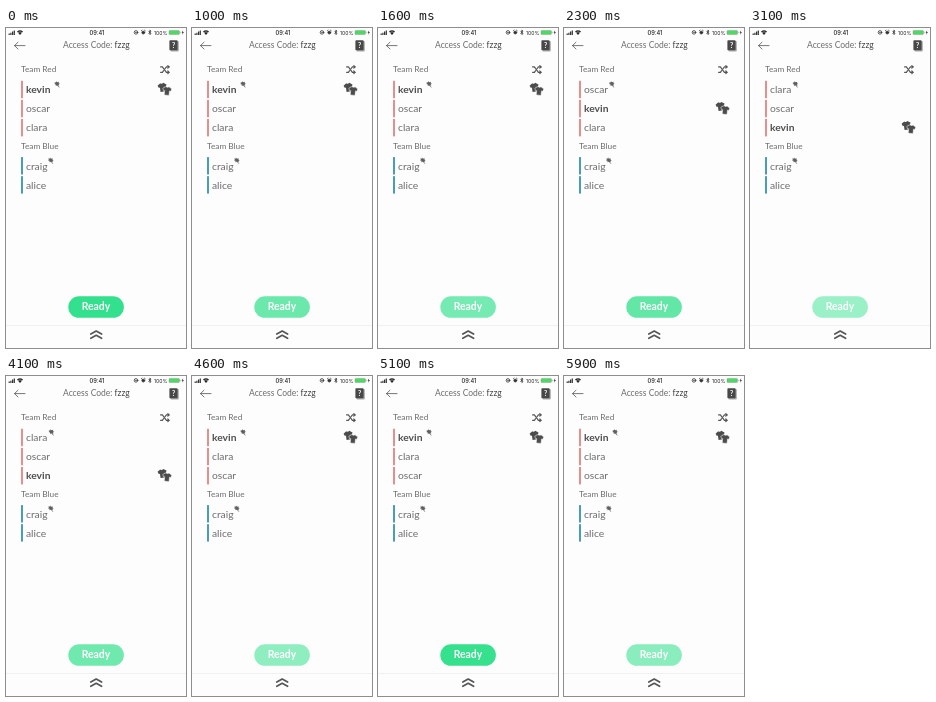
Recreate the animation shown at these times as an HTML page. Size 180 by 320 pixels, loop 6 s.

```html
<!DOCTYPE html>
<html lang="en">
<head>
<meta charset="utf-8">
<title>Team lobby</title>
<style>
html, body { margin: 0; width: 100%; height: 100%; overflow: hidden; background: #fdfdfd; }
svg { display: block; width: 100vw; height: 100vh; }
text { font-family: Lato, "Open Sans", sans-serif; fill: #6c6c6c; }
.name { font-size: 10.3px; }
.me { font-weight: 700; fill: #505050; }
.team { font-size: 8.3px; }
.status { font-family: Inter, Roboto, sans-serif; fill: #222; }
.line { fill: none; stroke: #555; stroke-linecap: round; stroke-linejoin: round; }
</style>
</head>
<body>
<svg viewBox="0 0 180 320" xmlns="http://www.w3.org/2000/svg">
  <defs>
    <path id="leaf" fill="#606060" d="M0 .8 1.5 1.2 2 0 3 1.1 4.6.6 4.4 2 5.7 2.6 4.4 3.3 5 4.4 3.6 4.2 5.4 6 4.8 6.2 2.8 4.2 1.4 4.6 1.5 3.2 0 2.8 .9 1.9Z"/>
    <path id="shirt" d="M0 2 3 0Q4.5 1.4 6 0L9 2 8 4.6 6.9 4.1V8.6H2.1V4.1L1 4.6Z"/>
  </defs>
  <rect width="180" height="320" fill="#fdfdfd"/>

  <!-- status bar -->
  <path d="M3.2 6.9V5.6M4.9 6.9V4.7M6.6 6.9V3.6M8.3 6.9V2.4" stroke="#333" stroke-width="1.2"/>
  <path fill="#222" d="M11 3.5Q14 .9 17 3.5L14 7Z"/>
  <path class="line" d="M12 4.5Q14 2.8 16 4.5" stroke-width=".5" style="stroke:#fdfdfd"/>
  <text class="status" x="91" y="6.6" font-size="5.7" font-weight="500" text-anchor="middle">09:41</text>
  <g class="line" stroke-width=".8" style="stroke:#333">
    <circle cx="130" cy="4.4" r="1.8"/><path d="M129.5 4.4h1"/>
    <circle cx="137.3" cy="4.6" r="1.4" fill="#333"/><path d="M135.4 2.7l.7-.5M139.2 2.7l-.7-.5"/>
    <path d="M142.8 3.2 145 5.5 143.9 6.6V2.1L145 3.2 142.8 5.5"/>
  </g>
  <text class="status" x="148" y="6.5" font-size="5.1">100%</text>
  <rect x="163" y="2.4" width="10.4" height="4.2" rx=".8" fill="#4cd964" stroke="#888" stroke-width=".4"/>
  <path d="M174.2 3.7v1.6" stroke="#888" stroke-width=".6"/>
  <path fill="#333" d="M177.2 2.2 175.6 4.8H176.6L176.2 6.8 177.9 4.1H176.9Z"/>

  <!-- header -->
  <path class="line" stroke-width=".8" d="M19 17.6H8.5M12 14.2 8.5 17.6 12 21"/>
  <text x="57" y="20.2" font-size="8.5">Access Code: <tspan fill="#444">fzzg</tspan></text>
  <rect x="164.4" y="13" width="8.4" height="10.6" rx="1" fill="#a8a8a8"/>
  <rect x="163.4" y="12.2" width="8.2" height="10" rx=".8" fill="#484848"/>
  <text x="167.5" y="19.6" font-size="7" font-weight="700" text-anchor="middle" style="fill:#fff">?</text>

  <!-- teams -->
  <text class="team" x="15" y="44.2">Team Red</text>
  <text class="team" x="15" y="120.8">Team Blue</text>
  <g class="line" stroke-width="1.2">
    <path d="M154.6 38.9H156.4L160.4 44.3H163M154.6 44.3H156.4L157.6 42.7M159.2 40.5 160.4 38.9H163"/>
    <path d="M161.8 37.6 163.1 38.9 161.8 40.2M161.8 43 163.1 44.3 161.8 45.6"/>
  </g>
  <g id="bars"></g>
  <g id="rows"></g>
  <g id="shirts" fill="#4c4c4c">
    <use href="#shirt" transform="translate(151.8 55) rotate(-8 4.5 4)"/>
    <use href="#shirt" transform="translate(156.6 58.6) rotate(6 4.5 4)" stroke="#fdfdfd" stroke-width=".5"/>
  </g>

  <!-- footer -->
  <rect id="pill" x="62.3" y="268.3" width="55.6" height="21.5" rx="10.75"/>
  <text x="90" y="282.3" font-size="10.4" font-weight="700" text-anchor="middle" style="fill:#fff">Ready</text>
  <path d="M0 297.5H180" stroke="#f0f0f0" stroke-width="1"/>
  <path class="line" stroke-width="1.7" d="M84.8 306 90.2 303 95.6 306M84.8 310.3 90.2 307.3 95.6 310.3"/>
</svg>
<script>
const LOOP = 6000, ROW = 19.1, PULSE = 1260;
const $ = id => document.getElementById(id);
const rowY = i => 65 + i * ROW;

function make(tag, attrs, parent) {
  const el = document.createElementNS("http://www.w3.org/2000/svg", tag);
  for (const k in attrs) el.setAttribute(k, attrs[k]);
  return parent.appendChild(el);
}

function addName(name, y, cls = "") {
  const el = make("text", { x: 20, y, class: "name " + cls }, $("rows"));
  el.textContent = name;
  return el;
}

for (let i = 0; i < 5; i++) {
  const blue = i > 2;
  make("rect", {
    x: 15, y: 52.8 + i * ROW + (blue ? 19 : 0), width: 2, height: 17.4,
    fill: blue ? "#4b9bbd" : "#e58e8e"
  }, $("bars"));
}

const red = {
  kevin: addName("kevin", rowY(0), "me"),
  oscar: addName("oscar", rowY(1)),
  clara: addName("clara", rowY(2))
};
const leafX = { kevin: 48.3, oscar: 45, clara: 42.6 };
addName("craig", 141.6);
addName("alice", 160.6);
const leaf = make("use", { href: "#leaf" }, $("rows"));
make("use", { href: "#leaf", transform: "translate(42 129.6)" }, $("rows"));

// team order after each shuffle
const orders = [
  [0, ["kevin", "oscar", "clara"]],
  [1800, ["oscar", "kevin", "clara"]],
  [2600, ["clara", "oscar", "kevin"]],
  [4600, ["kevin", "clara", "oscar"]]
];

function fade(t) {
  const a = 2 * Math.PI * t / PULSE - 0.1;
  return 0.52 * Math.pow((1 - Math.cos(a)) / 2, 0.7);
}

function draw(t) {
  const order = orders.filter(o => o[0] <= t).pop()[1];
  order.forEach((name, i) => red[name].setAttribute("y", rowY(i)));
  leaf.setAttribute("transform", `translate(${leafX[order[0]]} 53.2)`);
  $("shirts").setAttribute("transform", `translate(0 ${order.indexOf("kevin") * ROW})`);
  const k = fade(t);
  const rgb = [50, 224, 140].map(c => Math.round(c + (255 - c) * k));
  $("pill").setAttribute("fill", `rgb(${rgb})`);
}

const start = performance.now();
function tick() {
  draw((performance.now() - start) % LOOP);
  requestAnimationFrame(tick);
}
tick();
</script>
</body>
</html>
```
